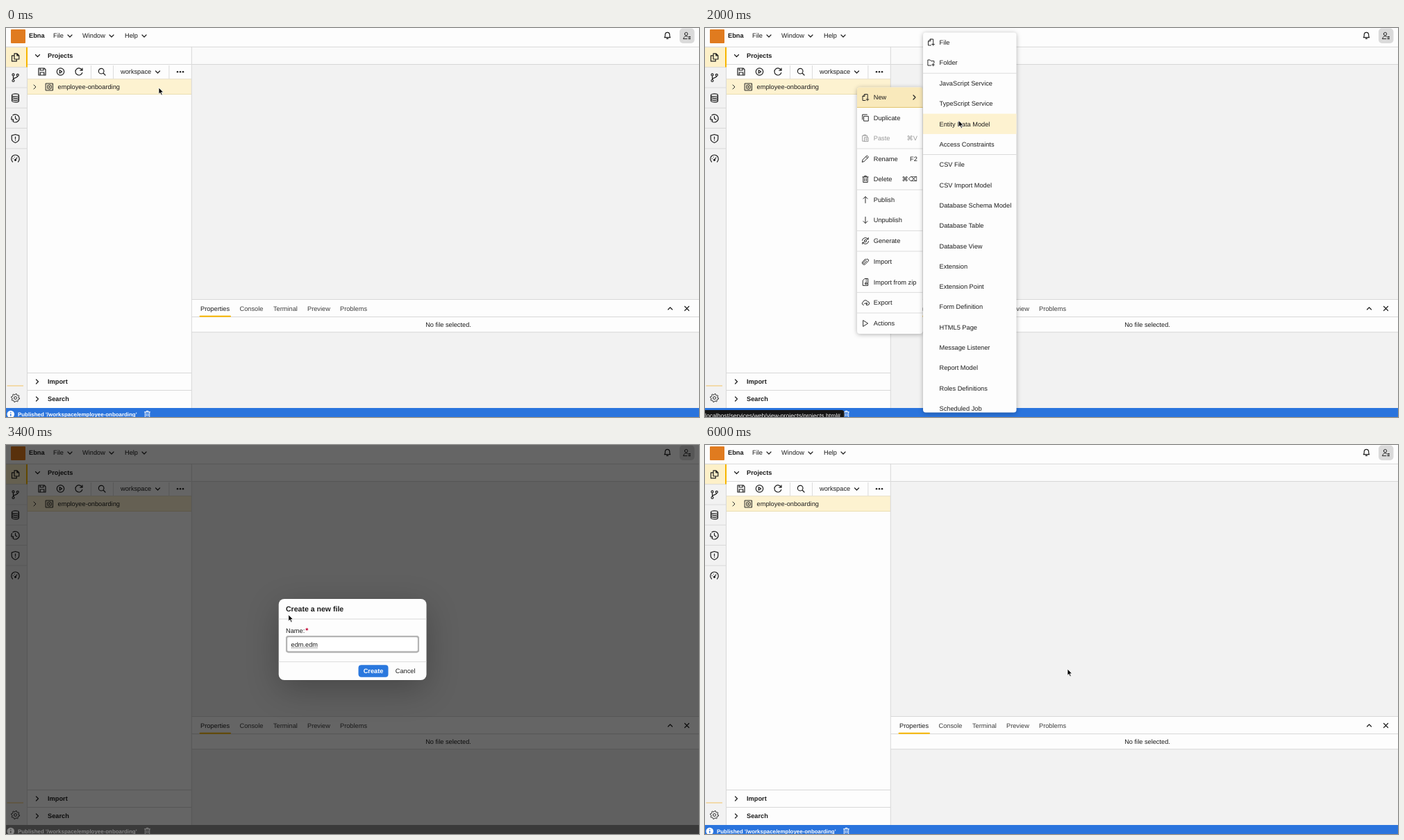
Recreate the animation shown at these times as an HTML page. Size 998 by 561 pixels, loop 6070 ms.

```html
<!DOCTYPE html>
<html lang="en">
<head>
<meta charset="utf-8">
<title>Create a new file</title>
<style>
html, body { margin: 0; width: 100%; height: 100%; overflow: hidden; background: #f2f2f2; }
svg { display: block; width: 998px; height: 561px; }
text { font: 9.24px "Liberation Sans", Arial, sans-serif; fill: #1c1c1c; text-rendering: geometricPrecision; white-space: pre; }
.b { font-weight: bold; }
.i { fill: none; stroke: #1f1f1f; stroke-width: 1.2; stroke-linejoin: round; stroke-linecap: round; }
.thin { stroke-width: .95; }
.off { opacity: .45; }
.key { font-family: "Liberation Sans", "DejaVu Sans", sans-serif; text-anchor: end; }
.menu { filter: drop-shadow(0 1.5px 3px rgba(0,0,0,.3)); }
</style>
</head>
<body>
<svg id="stage" viewBox="0 0 998 561" xmlns="http://www.w3.org/2000/svg"></svg>
<script>
const LOOP = 6070, LINE = '#d4d4d4', PAPER = '#fdfdfd', GOLD = '#f7b500';
const ROW = 29.3;

// Markup helpers; text is placed by the middle of its line.
const rect = (x, y, w, h, fill, more = '') => `<rect x="${x}" y="${y}" width="${w}" height="${h}" fill="${fill}" ${more}/>`;
const text = (x, y, s, cls = '', more = '') => `<text x="${x}" y="${y + 3.3}" class="${cls}" ${more}>${s}</text>`;
const icon = (x, y, d, cls = '') => `<path class="i ${cls}" transform="translate(${x} ${y})" d="${d}"/>`;
const group = (id, body, more = '') => `<g id="${id}" ${more}>${body}</g>`;
const ring = (x, y, r) => `M${x - r} ${y}a${r} ${r} 0 1 0 ${2 * r} 0a${r} ${r} 0 1 0 ${-2 * r} 0`;

function gear(r, teeth) {
  let d = '';
  for (let k = 0; k < teeth * 4; k++) {
    const a = (k + .5) / (teeth * 4) * 2 * Math.PI, q = k % 4 < 2 ? r : r * .76;
    d += `${k ? 'L' : 'M'}${(q * Math.cos(a)).toFixed(2)} ${(q * Math.sin(a)).toFixed(2)}`;
  }
  return d + 'Z' + ring(0, 0, r * .33);
}

const SIGN = {
  down: 'M-3 -1.5L0 1.5L3 -1.5',
  up: 'M-3 1.5L0 -1.5L3 1.5',
  right: 'M-1.5 -3L1.5 0L-1.5 3',
  close: 'M-3 -3L3 3M3 -3L-3 3',
  copy: 'M-1.5 -5.5H2.5L5.3 -2.7V2.7H-1.5ZM2.3 -5.3V-2.5H5M-1.5 -2.5H-5V5.6H1.8V2.7',
  branch: ring(-3, -4.2, 1.5) + ring(-3, 4.4, 1.5) + ring(3.3, -3.8, 1.5) + 'M-3 -2.7V2.9M3.3 -2.3C3.3 1 -3 -.5 -3 2.6',
  data: 'M-5 -4A5 2 0 0 1 5 -4A5 2 0 0 1 -5 -4V4A5 2 0 0 0 5 4V-4M-5 -1.3A5 2 0 0 0 5 -1.3M-5 1.4A5 2 0 0 0 5 1.4',
  history: 'M-3.6 -4.4A5.7 5.7 0 1 1 -1.8 5.5M-5.6 .2V-.4A5.7 5.7 0 0 1 -5 -2.6M-4.6 3.6L-4.5 3.7M0 -2.8V.4L2.4 1.8M-6 1.5L-3 2V5',
  shield: 'M0 -6L5.3 -4.4V0C5.3 3 2.7 5 0 6C-2.7 5 -5.3 3 -5.3 0V-4.4ZM0 -2.4V.4M0 2.4V2.5',
  gauge: 'M-4 4.2A5.8 5.8 0 1 1 4 4.2M0 1.2L2.4 -1.8M-3.3 -.3H-3.2M-1.2 -2.8V-2.7' + ring(0, 1.5, 1),
  save: 'M-5 -5H3L5 -3V5H-5ZM-2.7 -5V-2H2V-5M-2.7 5V1H2.7V5',
  play: ring(0, 0, 5.2) + 'M-1.3 -2.2V2.2L2.2 0Z',
  redo: 'M4.7 -1.8A5 5 0 1 0 4.8 1.5M5 -5V-1.8H1.8',
  find: ring(-.8, -.8, 3.8) + 'M2 2L5 5',
  project: 'M-5 -5H5V5H-5ZM-3 -3L3 3M3 -3L-3 3M-1.2 -3H1.2M-1.2 3H1.2M-3 -1.2V1.2M3 -1.2V1.2',
  bell: 'M-4.2 2.7C-3 1.7 -3.3 0 -3.2 -1.5A3.2 3.2 0 0 1 3.2 -1.5C3.3 0 3 1.7 4.2 2.7ZM-1 4.4H1',
  user: ring(-1, -2.4, 2.2) + 'M-4.8 4.6C-4.8 0 .8 .3 1.2 1.6M-4.8 4.6H.3M2.5 1.5H5M2.5 3.2H5M2.5 4.8H5',
  trash: 'M-4 -3.2H4M-1.3 -3.2V-4.7H1.3V-3.2M-3.2 -3V4.6H3.2V-3M-1.2 -1V2.7M1.2 -1V2.7',
  file: 'M1 -4.4H-1L-4 -1.5V4.5H0M1 -4.4H3.2V.6M-1 -4.4V-1.5H-4M1.2 3H4.8M3 1.2V4.8',
  folder: 'M0 4H-4.6V-4H-1.5L0 -2.4H4.4V.4M1.3 3H4.9M3.1 1.2V4.8',
  twin: 'M-2 -2.2H4.3V4.6H-2ZM-4.3 2.4V-4.6H2.4',
  paste: 'M-1.5 4.4H-4.3V-3.6H2.6V-1.4M-2.2 -3.6V-4.8H.6V-3.6M-1 -1H4V4.8H-1ZM.7 1H2.4M.7 2.8H2.4',
  pen: 'M-4.6 4.6L-3.8 1.3L2.3 -4.5L4.5 -2.4L-1.6 3.7ZM.7 -3L2.9 -.8',
  north: 'M0 4.5V-4.5M-3 -1.6L0 -4.6L3 -1.6',
  south: 'M0 -4.5V4.5M-3 1.6L0 4.6L3 1.6',
  cycle: ring(0, 0, 1.6) + 'M-4.6 -.6A4.6 4.2 0 0 1 3.8 -2.6M4.6 .6A4.6 4.2 0 0 1 -3.8 2.6M4.2 -4.6V-2.2H1.8M-4.2 4.6V2.2H-1.8',
  clip: 'M2 -1L-1.6 2.6A1.1 1.1 0 0 1 -3 1.2L1.3 -3.2A1.9 1.9 0 0 1 4 -.5L-.6 4A2.7 2.7 0 0 1 -4.3 .4L0 -4',
  zip: 'M-3.7 4.8V-2L-1 -4.8H3.7V4.8ZM1.2 -4.6V-3M1.2 -1.6V0M0 1.4H2.2V3.2H0Z',
  cloud: 'M-2.6 3.6A2.4 2.4 0 0 1 -3.2 -1A3.3 3.3 0 0 1 3 -1.4A2.5 2.5 0 0 1 3.2 3.6H1.6M-1.3 1.3H2.6M1.2 -.2L2.7 1.3L1.2 2.8',
  run: 'M-3 -4.2L3.6 0L-3 4.2Z'
};

function topBar() {
  let s = rect(0, 0, 998, 27, PAPER) + rect(7, 2, 21, 20, '#e07b1f', 'rx="1"') + text(33, 11, 'Ebna', 'b');
  [['File', 68, 92], ['Window', 110, 152], ['Help', 171, 199]].forEach(([name, x, cx]) => {
    s += text(x, 11, name) + icon(cx, 11.5, SIGN.down);
  });
  return s + icon(952.5, 11, SIGN.bell) + rect(970, .5, 21.5, 21.5, '#dadada', 'rx="5"') + icon(980.5, 11, SIGN.user, 'thin');
}

function sideBar() {
  let s = rect(0, 27, 30, 521, '#f2f2f2') + rect(0, 27.5, 30, 29, '#fdf0c8');
  ['copy', 'branch', 'data', 'history', 'shield', 'gauge'].forEach((name, k) => {
    s += icon(13.5, 42.3 + k * ROW, SIGN[name]);
    if (k < 5) s += rect(0, 56.3 + k * ROW, 30, .8, LINE);
  });
  return s + rect(1.5, 515.5, 23.5, 1, '#f3c465') + icon(13.5, 533.5, gear(6, 8), 'thin');
}

function projectPanel() {
  let s = rect(30, 27, 237, 521, PAPER) + rect(30, 27, .9, 521, LINE) + rect(29, 27.5, 2, 29, GOLD);
  s += icon(45.5, 40, SIGN.down) + text(60, 40, 'Projects', 'b') + rect(31, 52, 236, .9, LINE);
  [['save', 52], ['play', 78.5], ['redo', 105], ['find', 138]].forEach(([name, x]) => s += icon(x, 63, SIGN[name]));
  [122, 154, 234.5].forEach(x => s += rect(x, 54, .8, 19, LINE));
  s += text(165, 63, 'workspace') + icon(218.5, 63.5, SIGN.down);
  [247, 251, 255].forEach(x => s += `<circle cx="${x}" cy="63.3" r="1.25" fill="#1f1f1f"/>`);
  s += rect(31, 73.5, 236, 22, '#fdf2d0') + rect(31, 73.3, 236, .8, '#e3dcc6') + rect(31, 95, 236, .8, '#e8d9a4');
  s += icon(41.5, 85, SIGN.right, 'thin') + icon(62.5, 85, SIGN.project, 'thin') + text(74.6, 85, 'employee-onboarding');
  [['Import', 510], ['Search', 535]].forEach(([name, y]) => {
    s += rect(31, y - 13, 236, .9, LINE) + icon(45, y, SIGN.right) + text(60, y, name, 'b');
  });
  return s + rect(266.8, 27, .9, 521, LINE);
}

function mainArea() {
  let s = rect(267.5, 27, 731, 25.5, '#fafafa') + rect(267.5, 52, 731, .9, LINE);
  s += rect(267.5, 391, 731, 47.5, PAPER);
  [391, 416.2, 438.3].forEach(y => s += rect(267.5, y, 731, .9, LINE));
  [['Properties', 280], ['Console', 336.5], ['Terminal', 385], ['Preview', 434], ['Problems', 481]].forEach(([name, x]) => {
    s += text(x, 404.5, name, '', x > 280 ? 'style="fill:#3c3c3c"' : '');
  });
  s += rect(278.5, 414.7, 45.5, 2, GOLD, 'rx="1"') + icon(956.5, 404.5, SIGN.up) + icon(980.5, 404.5, SIGN.close);
  return s + text(637, 427.8, 'No file selected.', '', 'text-anchor="middle"');
}

function contextMenu() {
  const items = [
    ['New', 'file', 100], ['Duplicate', 'twin', 129.5], ['Paste', 'paste', 158.8, '⌘V'],
    ['Rename', 'pen', 188.5, 'F2'], ['Delete', 'trash', 218, '⌘⌫'], ['Publish', 'north', 247.8],
    ['Unpublish', 'south', 277], ['Generate', 'cycle', 307], ['Import', 'clip', 337],
    ['Import from zip', 'zip', 366.2], ['Export', 'cloud', 396], ['Actions', 'run', 426]
  ];
  let s = rect(219, 85.5, 94.5, 355.5, PAPER, 'rx="4" class="menu"');
  s += group('newRow', `<path d="M219 114.5V89.5a4 4 0 0 1 4 -4H309.5a4 4 0 0 1 4 4V114.5Z" fill="#f9e9bb"/>` + rect(219, 114, 94.5, .9, '#e0bf62'));
  [174, 233.2, 292.3, 322, 381.3, 411].forEach(y => s += rect(219, y - .4, 94.5, .8, LINE));
  for (const [name, sign, y, key] of items) {
    s += `<g class="${name === 'Paste' ? 'off' : ''}">` + icon(231, y, SIGN[sign], 'thin') + text(242.8, y, name)
      + (key ? text(305.8, y, key, 'key') : '') + '</g>';
  }
  return s + icon(301.5, 100, SIGN.right);
}

function subMenu() {
  const parts = [
    [79.7, ['JavaScript Service', 'TypeScript Service', 'Entity Data Model', 'Access Constraints']],
    [197, ['CSV File', 'CSV Import Model', 'Database Schema Model', 'Database Table', 'Database View', 'Extension', 'Extension Point',
      'Form Definition', 'HTML5 Page', 'Message Listener', 'Report Model', 'Roles Definitions', 'Scheduled Job']]
  ];
  let s = rect(314, 6.5, 134.5, 548, PAPER, 'rx="4" class="menu"') + rect(314, 0, 134.5, ROW, '#fdf2d0', 'id="hover"');
  s += icon(325.5, 20.5, SIGN.file, 'thin') + text(337.5, 20.5, 'File') + icon(325.5, 50, SIGN.folder, 'thin') + text(337.5, 50, 'Folder');
  s += rect(314, 64.8, 134.5, .8, LINE) + rect(314, 182.2, 134.5, .8, LINE);
  for (const [y, names] of parts) names.forEach((name, k) => s += text(337.5, y + k * ROW, name));
  return s;
}

function dialog() {
  const box = (id, inset, color, width) => `<rect id="${id}" x="${403.5 + inset}" y="${275.5 + inset}" width="${191 - 2 * inset}" height="${23.5 - 2 * inset}" rx="3" fill="none" stroke="${color}" stroke-width="${width}"/>`;
  let s = rect(0, 0, 998, 561, '#000', 'opacity=".6"');
  s += rect(393, 235, 212, 117, '#000', 'rx="8" opacity=".26" style="filter:blur(24px)"');
  s += rect(392.7, 222, 212.8, 117, PAPER, 'rx="8"') + rect(392.7, 250.6, 212.8, .8, '#cfcfcf') + rect(392.7, 312.3, 212.8, .8, '#d4d4d4');
  s += text(403, 237, 'Create a new file', 'b', 'style="font-size:10.56px"') + text(403, 267.3, 'Name:');
  s += text(431.3, 267.8, '*', 'b', 'style="fill:#c00030;font-size:10.5px"');
  s += rect(403.5, 275.5, 191, 23.5, '#fff', 'rx="3"');
  s += box('edge', 0, '#8c8c8c', .8) + box('slim', 1.2, '#c4c4c4', 1) + box('thick', .6, '#b4b4b4', 2.2);
  s += rect(410.5, 282, 18, 11, '#f9b90a', 'id="mark"') + text(410.5, 287.2, '', '', 'id="field"');
  s += '<path id="dots" d="M411 292.6H449" stroke="#555" stroke-width=".9" stroke-dasharray="1.2 1"/>';
  s += rect(449.3, 282, .8, 10.5, '#111', 'id="caret"');
  s += rect(507.5, 317.3, 43, 17.4, '#2a78de', 'rx="4" id="button"');
  s += text(529, 326, 'Create', 'b', 'text-anchor="middle" style="fill:#fff"');
  return s + text(560.8, 326, 'Cancel');
}

function statusBar() {
  let s = rect(0, 548, 998, 13, '#2a74dd', 'id="bar"') + '<circle id="badge" cx="6.8" cy="557" r="5.3"/>';
  s += '<path id="info" d="M6.8 556.3V559.8M6.8 553.8V555" stroke-width="1.4"/>';
  s += text(17, 556.8, "Published '/workspace/employee-onboarding'", 'b', 'id="news" style="font-size:7.92px"');
  return s + `<g id="bin">${icon(203.5, 557, SIGN.trash, 'thin')}</g>`;
}

const tip = '<path d="M0 561V551H196.5a4 4 0 0 1 4 4V561Z" fill="#151515"/>'
  + text(0, 558.4, 'localhost/services/web/view-projects/projects.html#', '', 'style="fill:#f4f4f4;font-size:8.64px"');
const arrow = '<path d="M0 0V9.3L2.1 7.4L3.7 11L5.3 10.3L3.7 6.8H6.7Z" fill="#000" stroke="#fff" stroke-width=".8" stroke-linejoin="round"/>';

document.getElementById('stage').innerHTML = rect(0, 0, 998, 561, '#f2f2f2') + mainArea() + topBar() + sideBar() + projectPanel()
  + rect(0, 26.8, 998, .9, LINE) + rect(0, 27.5, 30, .3, LINE) + group('menu', contextMenu()) + group('under', '')
  + group('dialog', dialog()) + group('status', statusBar()) + group('sub', subMenu()) + group('tip', tip) + group('cursor', arrow);

const $ = id => document.getElementById(id);
const show = (id, on) => $(id).setAttribute('visibility', on ? 'inherit' : 'hidden');
const paint = (id, name, value) => $(id).style.setProperty(name, value);

// Pointer journeys: start, end, from x, y, to x, y.
const MOVES = [
  [470, 1270, 220, 86, 286, 101],
  [1470, 2130, 286, 101, 374, 137],
  [2800, 3730, 374, 137, 420, 288],
  [4870, 5870, 420, 288, 522, 323]
];

function pointer(t) {
  let at = MOVES[0].slice(2, 4);
  for (const [t0, t1, x0, y0, x1, y1] of MOVES) {
    if (t < t0) break;
    const u = Math.min(1, (t - t0) / (t1 - t0)), e = u * u * (3 - 2 * u);
    at = [x0 + (x1 - x0) * e, y0 + (y1 - y0) * e];
  }
  return at;
}

function draw(t) {
  const [x, y] = pointer(t), within = (a, b) => t >= a && t < b;
  const open = within(2600, 6000), focus = t < 5870, pasted = t >= 4730, marked = within(4000, 4730);
  const inField = x > 403 && x < 595 && y > 275 && y < 299;
  const onButton = x > 507 && x < 551 && y > 317 && y < 335;

  $('cursor').setAttribute('transform', `translate(${x.toFixed(2)} ${y.toFixed(2)})`);
  show('menu', within(70, 2330));
  show('newRow', within(200, 2330));
  show('sub', within(800, 2330));
  show('hover', within(800, 2330) && x > 314);
  $('hover').setAttribute('y', 65 + ROW * Math.floor((y - 65) / ROW));
  show('tip', within(270, 3000));

  show('dialog', open);
  show('thick', open && focus && !inField);
  show('slim', open && focus && inField);
  show('mark', open && marked);
  show('dots', open && !pasted);
  const since = t - (pasted ? 4730 : 2600);
  show('caret', open && focus && !marked && since % 1000 < 500);
  $('caret').setAttribute('x', pasted ? 520.4 : 449.3);
  $('field').textContent = pasted ? 'employee-onboarding.edm' : 'edm.edm';
  paint('button', 'fill', onButton ? '#2768c4' : '#2a78de');

  const back = open ? '#3a3a3a' : '#2a74dd', front = open ? '#858585' : '#fff';
  paint('bar', 'fill', back);
  paint('info', 'stroke', back);
  paint('badge', 'fill', front);
  paint('news', 'fill', front);
  $('bin').firstChild.style.stroke = front;
}

const start = performance.now();
function tick() {
  draw((performance.now() - start) % LOOP);
  requestAnimationFrame(tick);
}
tick();
</script>
</body>
</html>
```
